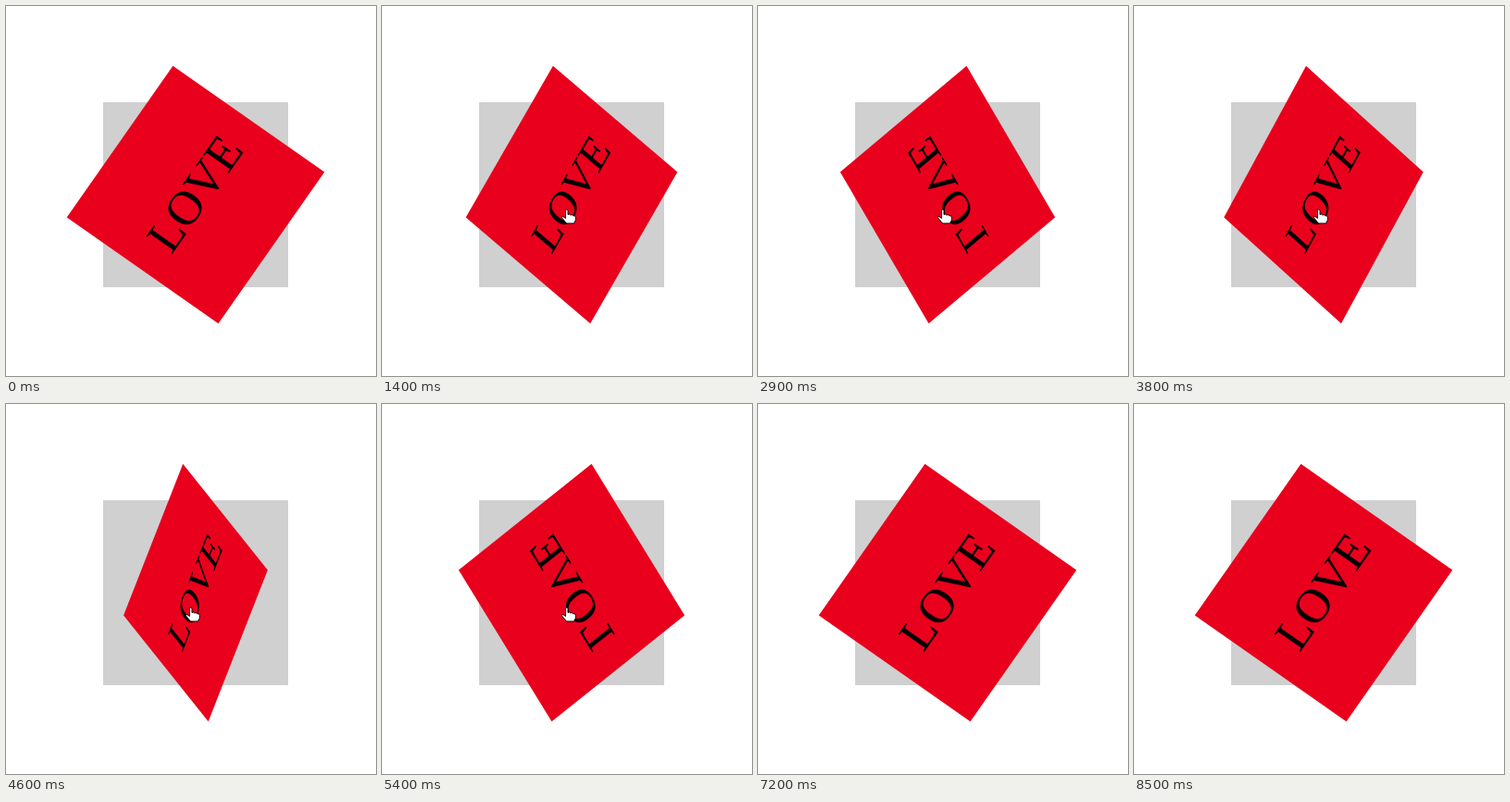
Write an HTML page that moves like this. It is 400x400 px and loops after 9.3 s.

```html
<!DOCTYPE html>
<html lang="en">
<head>
<meta charset="utf-8">
<title>Turning card</title>
<style>
  html, body { margin: 0; width: 100%; height: 100%; overflow: hidden; background: #fff; }
  svg { display: block; width: 400px; height: 400px; }
  text { font: 52px "Liberation Serif", Times, serif; text-anchor: middle; }
</style>
</head>
<body>
<svg viewBox="0 0 400 400">
  <rect x="105" y="104" width="200" height="200" fill="#d0d0d0"/>
  <g id="card">
    <g transform="rotate(-55)">
      <rect x="-100" y="-100" width="200" height="200" fill="#e9001c"/>
      <text x=".5" y="16">LOVE</text>
    </g>
  </g>
  <path id="hand" fill="#fff" stroke="#000" stroke-linejoin="round"
    d="M5 10V1.7Q5 .5 6 .5T7.5 1.7V6Q9.5 4.8 10.3 6.5Q12 5.5 13 7.2Q15.8 6.5 15.8 9V12L14 15.5H6L1 9.5Q.2 8 2 8Z"/>
</svg>
<script>
const LOOP = 9300, STEP = 100;
const SPIN_START = 1108, SPIN_END = 6900, TURN = 3022;
const card = document.getElementById('card');
const hand = document.getElementById('hand');

// pointer path: time, x, y
const path = [
  [1000, 208, 325], [1200, 198, 265], [1400, 193.5, 219.5],
  [6700, 193.5, 219.5], [6900, 201, 334]
];

function pointerAt(t) {
  const i = path.findIndex(p => p[0] >= t);
  if (i < 0 || t < path[0][0]) return null;
  if (i === 0) return path[0].slice(1);
  const a = path[i - 1], b = path[i];
  const k = (t - a[0]) / (b[0] - a[0]);
  return [a[1] + (b[1] - a[1]) * k, a[2] + (b[2] - a[2]) * k];
}

function draw(now) {
  const time = now % LOOP;
  const t = Math.floor(time / STEP) * STEP;
  const spinning = t >= SPIN_START && t < SPIN_END;
  const squash = spinning ? Math.cos((t - SPIN_START) / TURN * 2 * Math.PI) : 1;
  card.setAttribute('transform', `translate(205 204) scale(${squash} 1)`);

  const pos = pointerAt(t);
  hand.style.display = pos ? '' : 'none';
  if (pos) hand.setAttribute('transform', `translate(${pos})`);
}

function tick() {
  draw(performance.now());
  requestAnimationFrame(tick);
}
tick();
</script>
</body>
</html>
```
